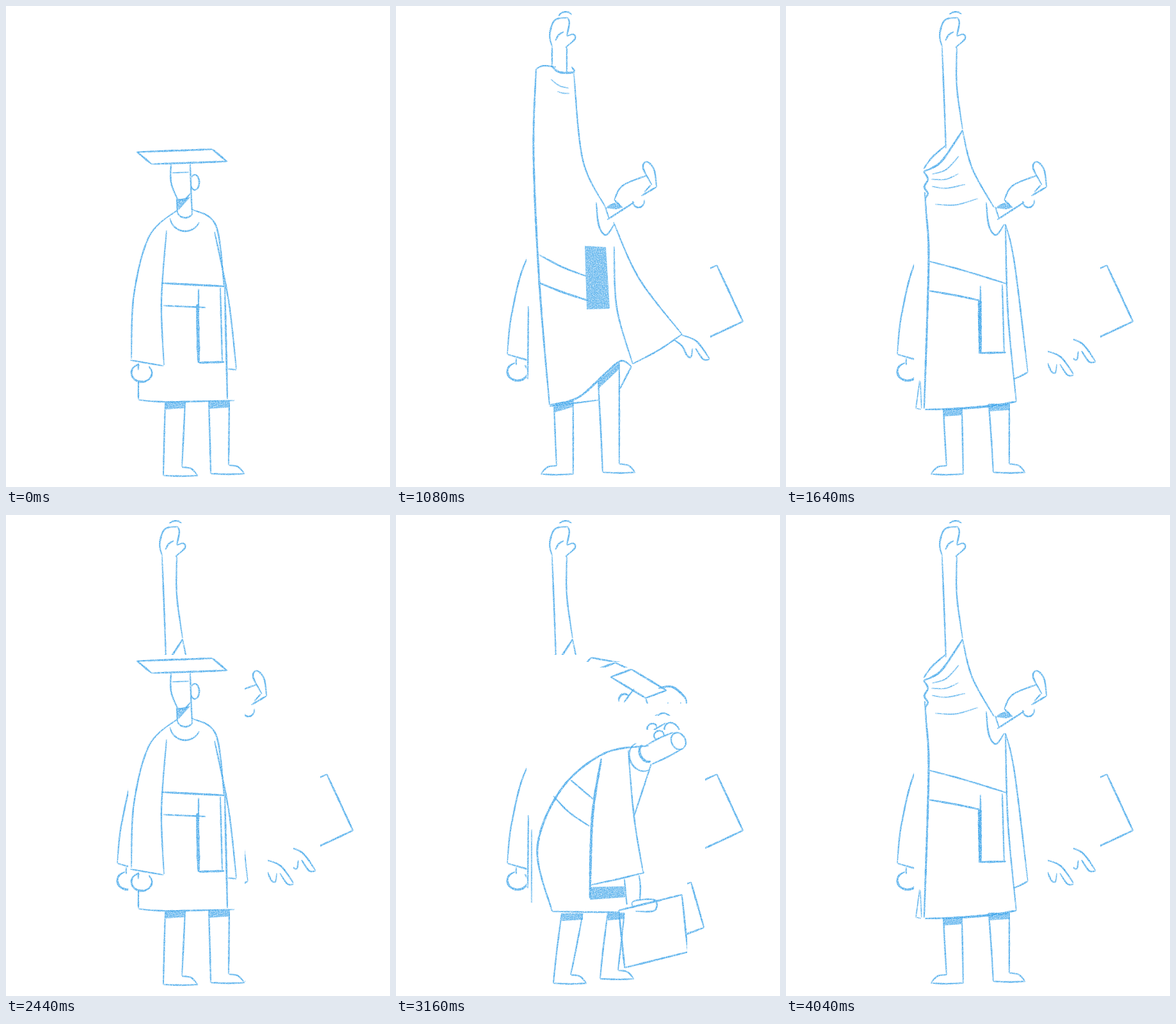
Write an HTML page that moves like this. It is 600x750 px and loops after 4.84 s.

```html
<!DOCTYPE html>
<html lang="en">
<head>
<meta charset="utf-8">
<title>Graduate pencil test</title>
<style>
html, body { margin: 0; width: 100%; height: 100%; overflow: hidden; background: #fff; }
#stage { display: block; width: 100vw; height: 100vh; }
</style>
</head>
<body>
<svg id="stage" viewBox="0 0 600 750">
  <defs>
    <filter id="grain" x="0" y="0" width="100%" height="100%" color-interpolation-filters="sRGB">
      <feTurbulence type="fractalNoise" baseFrequency=".7" numOctaves="2" seed="4"/>
      <feColorMatrix values="0 0 0 0 1  0 0 0 0 1  0 0 0 0 1  2 0 0 0 -.82"/>
    </filter>
  </defs>
  <g id="cels"></g>
  <rect width="600" height="750" filter="url(#grain)"/>
</svg>
<script>
const NS = 'http://www.w3.org/2000/svg';
const LOOP = 4840, STEP = 80, BLUE = '#38a2e9';

// ---- shapes: "width:x,y x,y ..." strokes joined by ";", "f:" is a shaded area ----
const join = (...parts) => parts.join(';');
const lerp = (a, b, k) => a + (b - a) * k;

function mix(a, b, k) {
  const to = b.match(/-?[\d.]+/g);
  let i = 0;
  return a.replace(/-?[\d.]+/g, n => lerp(+n, +to[i++], k).toFixed(1));
}

const warp = (s, f) => s.replace(/(-?[\d.]+),(-?[\d.]+)/g,
  (_, x, y) => f(+x, +y).map(v => v.toFixed(1)).join(','));
const move = (s, dx, dy) => warp(s, (x, y) => [x + dx, y + dy]);

function turn(s, deg) {
  const c = Math.cos(deg * Math.PI / 180), n = Math.sin(deg * Math.PI / 180);
  return warp(s, (x, y) => [x * c - y * n, x * n + y * c]);
}

function arc(x, y, rx, ry, from, to) {
  const points = [];
  for (let i = 0; i <= 8; i++) {
    const a = lerp(from, to, i / 8) * Math.PI / 180;
    points.push((x + rx * Math.cos(a)).toFixed(1) + ',' + (y + ry * Math.sin(a)).toFixed(1));
  }
  return points.join(' ');
}

// Parallelogram around a centre; a and b tilt its two sides.
function quad(x, y, w, h, a, b = a) {
  const corner = (i, j) => move(mixSides(turn(`${i * w / 2},0`, a), turn(`0,${j * h / 2}`, b)), x, y);
  const p = [corner(-1, -1), corner(1, -1), corner(1, 1), corner(-1, 1)];
  return p.map((q, i) => `2.6:${q} ${p[(i + 1) % 4]}`).join(';');
}
function mixSides(p, q) {
  const [dx, dy] = q.split(',').map(Number);
  return move(p, dx, dy);
}

// ---- body parts ----
function leg(x, y, w, fx, fy, fw, dir = 1, tilt = 0) {
  const right = dir > 0, ankle = right ? fx + fw : fx, heel = right ? fx : fx + fw;
  const side = (top, ty, foot, long) =>
    `${top},${ty} ${lerp(top, foot, .6)},${lerp(ty, fy, .55)} ${foot},${long ? fy : fy - 13}`;
  return join(side(x, y, fx, right), side(x + w, y + tilt, fx + fw, !right),
    `${ankle},${fy - 13} ${ankle + 14 * dir},${fy - 11} ${ankle + 24 * dir},${fy - 1}`,
    `${heel},${fy} ${ankle},${fy + 1} ${ankle + 25 * dir},${fy}`,
    `f:${x},${y} ${x + w},${y + tilt} ${x + w},${y + tilt + 10} ${x},${y + 12}`);
}
const legs = {
  stand: join(leg(249, 617, 31, 246, 732, 29), leg(317, 616, 32, 320, 729, 28)),
  bow: join(leg(247, 616, 31, 247, 729, 26), leg(317, 616, 30, 318, 726, 29)),
  low: join(leg(259, 621, 33, 246, 730, 27), leg(331, 620, 26, 319, 723, 28)),
  reach: join(leg(247, 622, 30, 251, 730, 26, -1, -7), leg(316, 585, 33, 323, 727, 26, 1, -29)),
  rest: join(leg(246, 628, 29, 251, 730, 26, -1), leg(317, 620, 32, 324, 727, 25))
};

const fist = (x, y) => '3:' + arc(x, y, 16, 14, 255, -45);
const sash = (x, y, h) => join(`5:${x},${y} ${x + 2},${y + h}`, `${x + 2},${y - 24} ${x + 2},${y + 18}`,
  `${x + 36},${y - 26} ${x + 39},${y + h}`, `3:${x + 2},${y + h} ${x + 42},${y + h - 1}`);

const headShape = join('-15,-2 -16,-26 -14,-50', '15,2 16,-26 15,-52', arc(-20, -28, 7, 8, 60, 300),
  arc(2, -51, 14, 11, 0, 360), arc(-2, 11, 23, 19, 185, 0), '4:' + arc(-4, 2, 14, 10, 180, 0));
const head = (x, y, deg) => move(turn(headShape, deg), x, y);

// ---- standing ----
const hat = quad(275, 235, 118, 30, -2, -50);
const face = join('258,246 258,275 268,301;1.6:259,260 286,259;268,301 279,302 288,292',
  '288,246 289,280 291,324;267,299 268,322;f:266,302 288,298 270,318',
  arc(295, 275, 7, 12, -140, 150), arc(280, 320, 12, 10, 175, 20), arc(280, 327, 24, 24, 170, 25));
const arm = join('268,318 224,359 200,450 196,550;251,350 243,460 247,560;194,552 246,561;207,557 207,568',
  fist(212, 572));
const armBack = join('255,330 204,396 181,480 174,543;251,350 234,460 226,556;174,543 226,558;188,549 188,560',
  fist(190, 570));
const gown = join('291,317 328,342 341,437;2.6:342,437 346,613;326,352 348,460 360,566;347,566 360,567',
  '3:244,432 342,437;246,467 312,470;207,585 207,613;207,614 250,617 357,615', sash(299, 465, 91));
const standing = [hat, face, arm, gown, legs.stand];

// ---- bowing ----
const robe = {
  bow: '3:368,338 300,355 240,430 219,530 235,613;233,615 300,616 367,611;250,407 286,428;233,446 260,461 292,474;390,368 367,452',
  low: '3:395,360 325,372 258,428 221,520 244,618;244,618 300,619 350,619;273,413 308,443;246,438 270,463 302,485;399,388 372,470'
};
const sleeve = {
  bow: '4:295,370 290,440 303,510;338,360 355,430 404,482;303,510 340,557 382,580;406,482 405,530 382,580;f:303,518 364,574 363,604 318,555',
  low: '4:321,380 307,470 303,598;363,367 372,470 386,556;303,577 345,568 386,558;386,556 387,557 386,559;f:304,580 356,579 358,596 303,600'
};
const hand = {
  bow: '407,503 425,501 444,495;407,527 440,527 463,520;444,497 470,487 471,495 461,518 468,528',
  low: '380,562 382,580 381,600;357,567 359,590 361,608;370,612 371,602 404,600 404,617 374,618'
};

// k = 1 is the full bow, k = 0 straightens the back, most at the shoulders.
const lean = (s, k) => warp(s, (x, y) => {
  const f = Math.pow(Math.max(0, (615 - y) / 277), 2.5) * (1 - k);
  return [x - 100 * f, y - 20 * f];
});
const bowTop = k => [lean(robe.bow, k), head(lerp(273, 383, k), lerp(304, 356, k), 45 * k)];
const bow = k => [...bowTop(k), lean(sleeve.bow, k), mix(legs.stand, legs.bow, k)];
const sink = k => [robe, sleeve, hand, legs].map(p => mix(p.bow, p.low, k))
  .concat(head(lerp(383, 395, k), lerp(356, 374, k), lerp(45, 63, k)));

// ---- arm thrown up, then both sleeves drop ----
const toss = {
  reach: join('3:219,98 215,230 224,430 240,622;219,98 230,93 250,95;3:243,93 255,103 278,103 274,95',
    '278,105 292,240 327,313;341,375 345,470 370,558;340,337 380,425 447,512;447,512 410,537 370,558',
    '224,388 260,407 297,421;3:225,432 260,446 300,459;3:240,622 285,610 330,570 352,553 368,562',
    '240,624 280,619 318,614;368,562 350,597;f:295,374 328,376 334,472 298,473'),
  rest: join('3:217,290 219,320 223,400 216,628;215,254 228,236 250,217;3:215,258 240,245 262,215 276,193',
    '276,194 291,253 325,314;343,340 347,480 360,617;343,340 357,400 378,571;378,571 367,577 355,582',
    '224,398 280,413 345,433;3:224,444 265,451 303,459;3:217,629 260,628 300,625 335,621 356,617',
    '245,629 300,626 350,621;360,617 350,619;f:300,460 306,460 305,542 301,542')
};
const forearm = {
  reach: '244,64 244,78 244,93;267,64 267,85 267,103',
  rest: '244,64 247,140 250,222;267,64 267,125 276,192'
};
const palm = '244,64 240,45 248,22 268,18;268,18 271,26 267,47;267,47 277,44 280,51 265,65;249,54 254,45 262,40';
const lookUp = join('341,302 354,280 392,264;341,302 353,314;330,313 343,307;330,333 372,306',
  arc(379, 304, 9, 10, 180, -10), '383,296 407,282;407,282 403,255 392,243 386,252 400,279;388,290 398,279',
  '313,306 317,342 328,357 341,340;327,313 333,331;f:327,315 343,308 355,314 344,317');
const openHand = '447,513 470,523 490,550;490,551 480,551 468,534;434,520 447,530 455,545 461,547 463,534';
const cuffFolds = '1.4:242,114 255,124 270,128;1.4:252,133 262,136 271,136';
const slackFolds = '1.4:228,262 250,255 270,234;1.4:227,270 250,270 270,261;1.4:228,281 250,284 280,278;1.4:233,309 265,310 300,300;3:215,258 222,270 216,282 222,292 218,300';
const train = '1.4:209,584 203,628;1.4:210,585 212,628;1.4:203,627 211,629';

const throwPose = k => [mix(toss.reach, toss.rest, k), mix(forearm.reach, forearm.rest, k),
  palm, lookUp, mix(legs.reach, legs.rest, k)];

// ---- cels: each repaints only its own box, so earlier drawings stay around it ----
const cels = [];
const cel = (left, top, right, ...art) => cels.push({ box: [left, top, right, 737], art });

cel(172, 219, 373, move(hat, 8, 2), move(face, 3, 1), armBack, gown, legs.stand);
cel(204, 219, 400, ...bow(.3), quad(327, 246, 75, 45, 10, 40), '207,468 206,582');
cel(208, 229, 460, ...bow(.65), quad(368, 253, 28, 85, -20, -65),
  '345,400 385,340 405,280;365,420 405,350 420,275', '1.6:212,490 212,605');
cel(214, 238, 491, ...bow(.88), quad(379, 263, 35, 64, -20, -59),
  '380,420 410,360 425,292;395,440 430,380 445,292', '3:' + arc(357, 289, 9, 10, 170, 320),
  '3:410,270 432,268 452,285 454,296;356,292 372,271;390,285 395,300');
cel(214, 294, 546, ...bow(1), hand.bow, quad(481, 467, 90, 97, -25), '434,473 437,498', '1.4:215,490 217,612');
cel(214, 313, 483, ...sink(.5), quad(427, 624, 94, 74, -20, -16));
cel(214, 335, 455, ...sink(1), quad(402, 649, 102, 90, -14, -6));

cel(208, 219, 491, ...bow(.75), move(hand.bow, -40, -20), quad(426, 437, 90, 97, -25));
cel(208, 60, 491, ...bowTop(.3), mix(legs.low, legs.reach, .6), quad(405, 140, 90, 70, -25),
  '3:300,345 340,270 365,200;345,400 390,300 410,215;365,200 388,204 410,215;378,202 386,160;398,206 402,162');
cel(208, 7, 491, ...throwPose(-.03), cuffFolds, move(openHand, 0, -8), arc(265, 18, 11, 9, 195, 330));

for (let i = 0; i < 8; i++) {
  const x = Math.min(1, i / 5), k = x * x * (3 - 2 * x);
  const art = throwPose(k);
  if (i < 4) art.push(move(openHand, -62 * k, 38 * k));
  else art.push(sash(302, 460, 81));
  if (i < 2) art.push(cuffFolds);
  if (i > 4) art.push(slackFolds, train);
  cel(i < 4 ? 208 : 200, i ? 13 : 16, i < 2 ? 491 : i < 4 ? 449 : 409, ...art);
}

// ---- pencil ----
const noise = n => { const s = Math.sin(n * 12.9898) * 43758.5453; return s - Math.floor(s); };

function curve(a, b, c, d, t) {
  const square = 2 * a - 5 * b + 4 * c - d;
  const cube = 3 * (b - c) + d - a;
  return b + .5 * t * (c - a + t * (square + t * cube));
}

function spline(p) {
  const out = [p[0]], last = p.length - 1;
  for (let i = 0; i < last; i++) {
    const a = p[Math.max(i - 1, 0)], b = p[i], c = p[i + 1], d = p[Math.min(i + 2, last)];
    const n = Math.max(3, Math.ceil(Math.hypot(c[0] - b[0], c[1] - b[1]) / 4));
    for (let j = 1; j <= n; j++) {
      out.push([0, 1].map(q => curve(a[q], b[q], c[q], d[q], j / n)));
    }
  }
  return out;
}

function outline(points, width, shift) {
  const left = [], right = [], end = points.length - 1;
  points.forEach(([x, y], i) => {
    const a = points[Math.max(i - 1, 0)], b = points[Math.min(i + 1, end)];
    const len = Math.hypot(b[0] - a[0], b[1] - a[1]) || 1;
    const nx = (a[1] - b[1]) / len, ny = (b[0] - a[0]) / len;
    const taper = .4 + .6 * Math.pow(Math.abs(Math.sin(Math.PI * i / end)), .4);
    const half = width / 2 * taper * (.8 + .4 * noise(i + x));
    const at = o => (x + nx * o).toFixed(1) + ',' + (y + ny * o).toFixed(1);
    left.push(at(shift + half));
    right.unshift(at(shift - half));
  });
  return 'M' + left.concat(right).join('L') + 'Z';
}

function add(parent, tag, attrs) {
  const el = document.createElementNS(NS, tag);
  for (const k in attrs) el.setAttribute(k, attrs[k]);
  return parent.appendChild(el);
}

function drawStroke(parent, text) {
  const [, kind, body] = text.match(/^(?:([^:]+):)?(.+)$/);
  const points = body.split(' ').map(p => p.split(',').map(Number));
  const ink = (d, opacity) => add(parent, 'path', { d, fill: BLUE, opacity });
  if (kind === 'f') {
    ink('M' + points.join('L') + 'Z', .75);
    return;
  }
  const width = +(kind || 2.2), line = spline(points);
  ink(outline(line, width, 0), .85);
  ink(outline(line, width * .7, 1), .3);
}

// ---- timeline ----
const layer = document.getElementById('cels');
const shown = [];

function addCel(start, { box: [x, y, r, b], art }) {
  const area = { x, y, width: r - x, height: b - y };
  const el = add(layer, 'svg', { ...area, viewBox: [x, y, r - x, b - y].join(' '), overflow: 'hidden' });
  add(el, 'rect', { ...area, fill: '#fff' });
  art.join(';').split(';').forEach(s => drawStroke(el, s));
  shown.push({ start, el });
}

function addRun(start, box, move) {
  addCel(start, { box, art: standing });
  cels.forEach((c, i) => addCel(move + STEP * i, c));
}
addRun(0, [0, 0, 600, 750], 280);
addRun(2440, [191, 218, 373, 737], 2680);

let current = -1;
function render(time) {
  const t = time % LOOP;
  const count = shown.filter(c => c.start <= t).length;
  if (count === current) return;
  current = count;
  shown.forEach((c, i) => { c.el.style.display = i < count ? '' : 'none'; });
}

const begin = performance.now();
function tick() {
  render(performance.now() - begin);
  requestAnimationFrame(tick);
}
tick();
</script>
</body>
</html>
```
